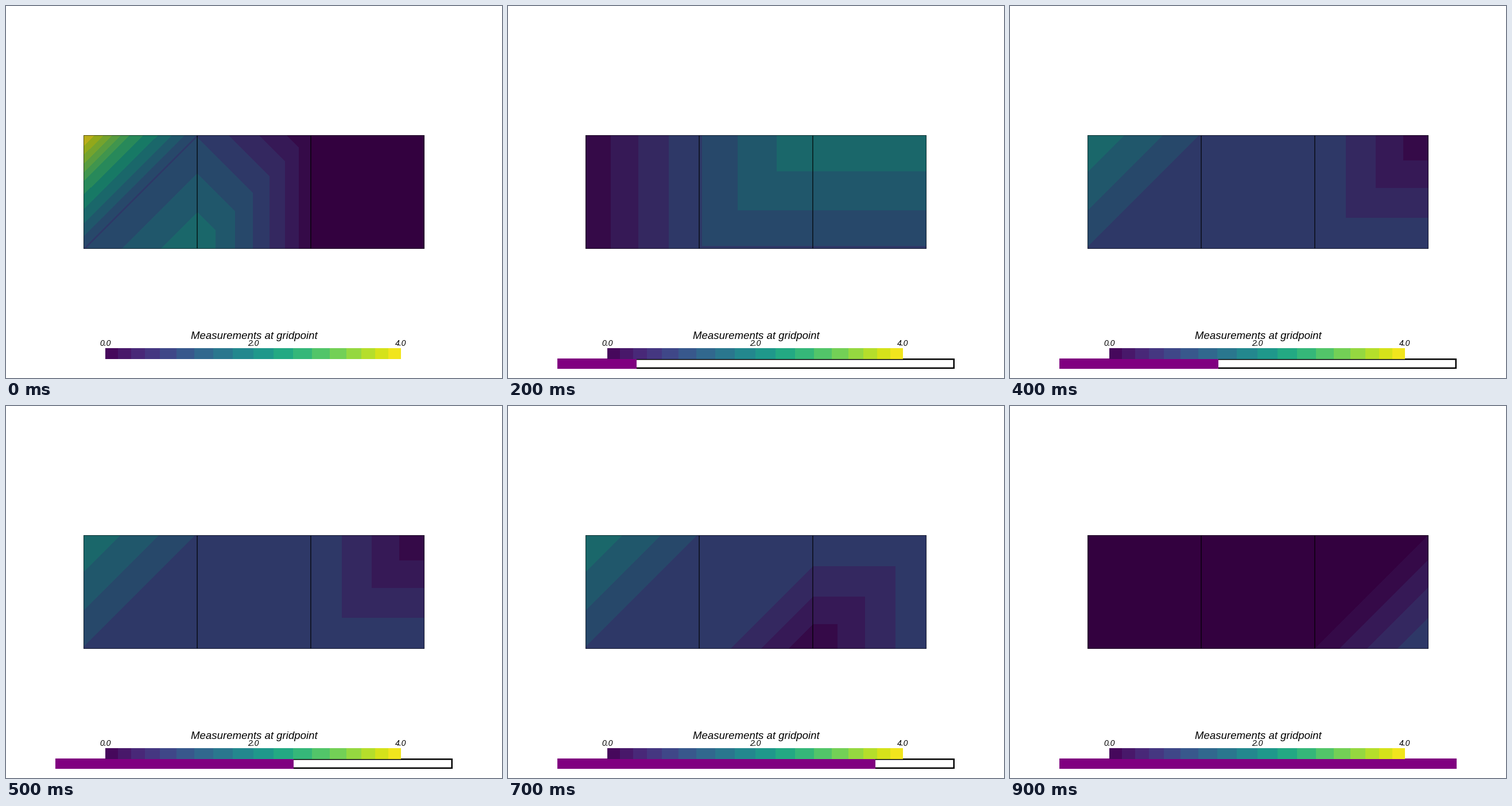
Write a matplotlib script that moves like this. It is 864x648 px and loops after 1000 ms.

```python
import matplotlib.pyplot as plt
import numpy as np
from matplotlib.animation import FuncAnimation
from matplotlib.patches import Rectangle
from matplotlib.tri import Triangulation

W, H, DPI = 864, 648, 100
PX = 72 / DPI  # points per pixel
VIRIDIS = plt.get_cmap("viridis")
LIGHT = 0.75   # shading of the mesh surface
MAX_VALUE = 4

LEFT, RIGHT = 135.2, 728.8
TOP, BOTTOM = 225.2, 422.8
COLUMNS = np.linspace(LEFT, RIGHT, 4)

# Readings differing from 1; points 0-3 are the top row, 4-7 the bottom row
READINGS = [
    {0: 4, 5: 2, 2: 0, 3: 0, 6: 0, 7: 0},
    {2: 2, 3: 2, 0: 0, 4: 0},
    {0: 2, 3: 0},
    {0: 2, 6: 0},
    dict.fromkeys(range(7), 0),
]

fig = plt.figure(figsize=(W / DPI, H / DPI), dpi=DPI, facecolor="white")
ax = fig.add_axes([0, 0, 1, 1])


def box(x0, y0, x1, y1, color, z, **style):
    return ax.add_patch(Rectangle((x0, y0), x1 - x0, y1 - y0, facecolor=color,
                                  linewidth=0, zorder=z, **style))


def label(x, y, text, size):
    ax.text(x, y, text, fontsize=size * PX, ha="center", va="baseline",
            family="Liberation Sans", style="italic", color="black", zorder=6)


def contour_levels():
    """Bands that widen up to the middle values, then stay even."""
    k = np.arange(9)
    widening = 0.0025 + 0.205 * k + 0.0125 * k ** 2
    even = np.arange(2.8, 3.9, 0.23)
    return np.concatenate([[-0.1], widening, even, [MAX_VALUE + 0.1]])


def lit_colors(levels):
    middle = levels[:-1] + 0.6 * np.diff(levels)
    return VIRIDIS(np.clip(middle / MAX_VALUE, 0, 1))[:, :3] * LIGHT


def build_mesh():
    triangles = []
    for i in range(3):
        triangles += [[i + 4, i + 1, i], [i + 4, i + 5, i + 1]]
    y = np.repeat([TOP, BOTTOM], 4)
    return Triangulation(np.tile(COLUMNS, 2), y, triangles)


def draw_field(mesh, readings):
    values = [readings.get(point, 1) for point in range(8)]
    levels = contour_levels()
    return ax.tricontourf(mesh, values, levels=levels, zorder=1,
                          colors=lit_colors(levels), antialiased=False)


def draw_cell_edges():
    ax.add_patch(Rectangle((135.5, 225.5), 593, 197, fill=False, snap=False,
                           linewidth=PX, edgecolor=(0, 0, 0, 0.55), zorder=2))
    for x in COLUMNS[1:3]:
        ax.plot([x, x], [226, 422], color="black", alpha=0.85, lw=1.4 * PX,
                solid_capstyle="butt", snap=False, zorder=2)


def draw_scalar_bar(x0=173, x1=688, bands=18):
    t = np.linspace(0, 1, bands + 1)
    edges = t - 0.24 * np.sin(2 * np.pi * t) / (2 * np.pi)
    for a, b in zip(edges, edges[1:]):
        box(x0 + a * (x1 - x0), 596, x0 + b * (x1 - x0), 615,
            VIRIDIS((a + b) / 2), 4, antialiased=False)
    label(432.3, 580, "Measurements at gridpoint", 18.7)
    for value in (0, 2, 4):
        x = x0 + value / MAX_VALUE * (x1 - x0)
        label(x, 592, f"{value:.1f}", 14)


fields = [draw_field(build_mesh(), readings) for readings in READINGS]
draw_cell_edges()
draw_scalar_bar()

# Progress bar, partly behind the scalar bar
BAR_L, BAR_R, BAR_T, BAR_B, BORDER = 86, 778, 614, 632, 2.5
progress = box(BAR_L, BAR_T, BAR_L, BAR_B, "purple", 3.5)
progress_parts = [
    progress,
    box(BAR_L, BAR_T, BAR_R, BAR_B, "black", 3),
    box(BAR_L + BORDER, BAR_T + BORDER, BAR_R - BORDER, BAR_B - BORDER,
        "white", 3.1, snap=False),
]

ax.set_xlim(0, W)
ax.set_ylim(H, 0)
ax.axis("off")


def update(frame):
    # The mesh and the progress bar advance on alternate frames
    for i, field in enumerate(fields):
        field.set_visible(i == frame // 2)
    done = (frame + 1) // 2
    for part in progress_parts:
        part.set_visible(done > 0)
    progress.set_width((BAR_R - BAR_L) * done / len(READINGS))
    return []


anim = FuncAnimation(fig, update, frames=2 * len(READINGS), interval=100,
                     repeat=True, repeat_delay=0, blit=False)
plt.show()
```
